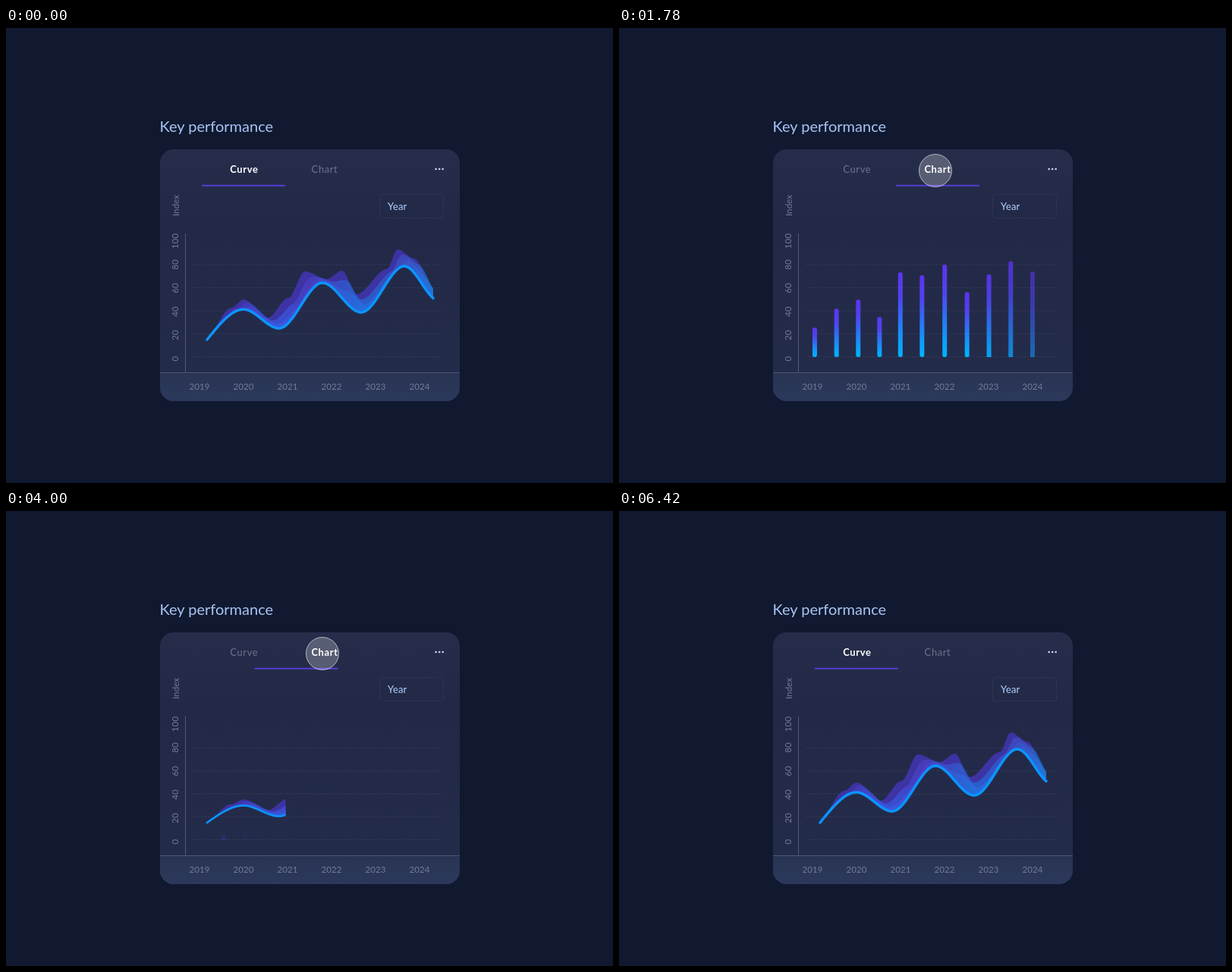
Recreate the animation shown at these times as an HTML page. Size 800x600 px, loop 6440 ms.

```html
<!DOCTYPE html>
<html lang="en">
<head>
<meta charset="utf-8">
<title>Key performance</title>
<style>
html, body { margin: 0; width: 100%; height: 100%; overflow: hidden; background: #10192f; }
svg { display: block; width: 800px; height: 600px; }
text { font-family: Lato, "Open Sans", sans-serif; }
.title { font-size: 20px; fill: #a9c4f5; }
.tab { font-size: 13px; letter-spacing: .6px; text-anchor: middle; fill: #6c728e; }
.on { font-weight: 700; fill: #fff; }
.axis { font-size: 11.5px; text-anchor: middle; fill: #737a98; letter-spacing: .1px; }
.grid { stroke: #363d5c; stroke-dasharray: 2 2; fill: none; }
</style>
</head>
<body>
<svg viewBox="0 0 800 600">
  <defs>
    <linearGradient id="cardFill" x2="0" y2="1">
      <stop stop-color="#262d4a"/><stop offset=".3" stop-color="#222947"/><stop offset="1" stop-color="#242c4b"/>
    </linearGradient>
    <linearGradient id="footFill" x2="0" y2="1">
      <stop stop-color="#293453"/><stop offset="1" stop-color="#2c395c"/>
    </linearGradient>
    <linearGradient id="barFill" x2="0" y2="1">
      <stop stop-color="#5c33f0"/><stop offset=".3" stop-color="#4e44ee"/><stop offset=".8" stop-color="#109bfa"/><stop offset="1" stop-color="#00b4ff"/>
    </linearGradient>
    <linearGradient id="waveFill" gradientUnits="userSpaceOnUse" x1="265" x2="565">
      <stop stop-color="#4a34b0"/><stop offset=".14" stop-color="#4b3bc0"/>
      <stop offset=".32" stop-color="#3563ee"/><stop offset=".45" stop-color="#4f3fc8"/>
      <stop offset=".68" stop-color="#1f78e6"/><stop offset=".87" stop-color="#3d55c8"/>
      <stop offset="1" stop-color="#1a86ee"/>
    </linearGradient>
    <clipPath id="reveal"><rect id="revealBox" x="256" y="260" height="194"/></clipPath>
    <clipPath id="aboveZero"><rect x="240" y="260" width="340" height="174"/></clipPath>
    <clipPath id="cardClip"><rect x="203" y="160" width="395" height="332" rx="18"/></clipPath>
  </defs>
  <rect width="800" height="600" fill="#10192f"/>
  <text class="title" x="202.5" y="137">Key performance</text>
  <g clip-path="url(#cardClip)">
    <rect x="203" y="160" width="395" height="332" fill="url(#cardFill)"/>
    <rect x="203" y="454" width="395" height="38" fill="url(#footFill)"/>
    <path d="M203 454.5H598" stroke="#4d5674"/>
  </g>
  <g id="axes"><path d="M236.5 271V454" stroke="#525977"/></g>
  <rect class="grid" x="492.5" y="219.5" width="84" height="31" rx="3"/>
  <text x="503" y="240" font-size="13" letter-spacing=".2" fill="#b4d0ff">Year</text>
  <g id="dots" fill="#ccd6f4"></g>
  <g id="tabs"></g>
  <rect id="underline" y="206.8" width="110" height="2" fill="#523dd2"/>
  <g id="bars" clip-path="url(#aboveZero)"></g>
  <g id="curve" clip-path="url(#reveal)">
    <g id="ribbon"></g>
    <path id="line" fill="none" stroke="#0b94ff" stroke-linecap="round" stroke-linejoin="round" vector-effect="non-scaling-stroke"/>
  </g>
  <circle id="cursor" r="21.5" fill="#fff" fill-opacity=".23" stroke="#fff" stroke-opacity=".6"/>
</svg>
<script>
const LOOP = 6440;
const CLICKS = [820, 2320, 3640, 5136]; // alternately Chart, Curve
const SLIDE = 600;
const RISE = 72;
const BASE = 411;
const ZERO = 434;

const $ = id => document.getElementById(id);
const set = (node, attrs) => { for (const key in attrs) node.setAttribute(key, attrs[key]); };
function add(parent, name, attrs, content = '') {
  const node = document.createElementNS('http://www.w3.org/2000/svg', name);
  set(node, attrs);
  node.textContent = content;
  return parent.appendChild(node);
}
const clamp = u => Math.max(0, Math.min(1, u));
const ease = u => { u = clamp(u); return u * u * (3 - 2 * u); };
const mix = (a, b, u) => a + (b - a) * u;

// A wave eases from each crest, trough or shelf to the next.
const wave = keys => x => keys.reduce((y, [keyX, keyY], i) =>
  i ? mix(y, keyY, ease((x - keys[i - 1][0]) / (keyX - keys[i - 1][0]))) : keyY, 0);
const lineY = wave([[217, 451], [313, 371], [360, 396], [417, 336], [468, 375], [525, 314], [571, 360]]);
const crestY = wave([[260, 414], [297, 369], [313, 358], [345, 382], [372, 356], [394, 321],
  [423, 331], [443, 320], [462, 351], [502, 318], [516, 292], [538, 304], [568, 356]]);

const xs = Array.from({ length: 150 }, (_, i) => 265 + 2 * i);
const trace = (f, list = xs) => list.map(x => `${x} ${f(x).toFixed(1)}`).join('L');

// Each layer trails the crest a little more and lies closer to the line.
for (let k = 0; k < 3; k++) {
  const top = x => Math.min(lineY(x), mix(crestY(x - 6 * k), lineY(x), .3 * k));
  add($('ribbon'), 'path', {
    d: `M${trace(top)}L${trace(lineY, [...xs].reverse())}Z`,
    fill: k ? 'url(#waveFill)' : '#4636c2', opacity: k ? .6 : .75
  });
}
$('line').setAttribute('d', 'M' + trace(lineY));

const axes = $('axes');
for (let i = 0; i < 6; i++) {
  add(axes, 'text', { class: 'axis', x: 255 + 58 * i, y: 477 }, 2019 + i);
  add(axes, 'text', { class: 'axis', transform: `translate(227 ${436 - 31 * i}) rotate(-90)` }, 20 * i);
  if (i < 5) add(axes, 'path', { class: 'grid', d: `M246 ${433.5 - 30.3 * i}H578` });
  if (i < 3) add($('dots'), 'circle', { cx: 566.7 + 4.5 * i, cy: 186, r: 1.3 });
}
add(axes, 'text', { class: 'axis', 'letter-spacing': .5, transform: 'translate(228 234) rotate(-90)' }, 'Index');

const tabs = [['Curve', 313.8], ['Chart', 420]].map(([name, x]) => ['tab', 'tab on'].map(
  style => add($('tabs'), 'text', { class: style, x, y: 191 }, name)));

// Half-yearly index values; the spacing tightens slightly around 2021.
const bars = [39, 64, 76, 53, 112, 108, 122, 86, 115, 143, 143].map((height, i) => add($('bars'), 'rect', {
  x: 255 + 28.7 * i - 2.3 * Math.exp(-(((i - 4.6) / 1.5) ** 2)),
  y: ZERO - height, width: 6, height, rx: 3, fill: 'url(#barFill)'
}));

const AWAY = [772, -27], ON_CHART = [417, 188], ON_CURVE = [321, 191];
function cursorAt(t) {
  let spot = AWAY;
  const move = (start, end, to) => {
    const u = ease((t - start) / (end - start));
    spot = spot.map((from, axis) => mix(from, to[axis], u));
  };
  CLICKS.forEach((click, i) => move(click - (i ? 360 : 740), click - 60, i % 2 ? ON_CURVE : ON_CHART));
  move(5300, 5935, AWAY);
  return { cx: spot[0], cy: spot[1] };
}

function draw(t) {
  const index = CLICKS.filter(click => click <= t).length - 1;
  const since = index < 0 ? LOOP : t - CLICKS[index];
  const toChart = index >= 0 && index % 2 === 0;
  const slide = ease(since / SLIDE);

  set($('underline'), { x: toChart ? mix(258, 365, slide) : mix(365, 258, slide) });
  const fade = clamp(since / 200);
  tabs.forEach(([plain, bold], i) => {
    const on = (i === 1) === toChart ? fade : 1 - fade;
    set(plain, { opacity: 1 - on });
    set(bold, { opacity: on });
  });

  // The curve closes all at once; opening, its height lags behind its length.
  const open = duration => toChart ? 1 - slide : ease((since - 63) / duration);
  const shown = open(660);
  const scaleY = s => `translate(0 ${BASE * (1 - s)}) scale(1 ${s})`;
  set($('revealBox'), { width: 6 + 305 * shown });
  set($('curve'), { opacity: Math.min(1, shown * 8) });
  set($('line'), { transform: scaleY(mix(.33, 1, open(690))), 'stroke-width': 2.2 + 1.3 * shown });
  set($('ribbon'), { transform: scaleY(mix(.35, 1, open(880))) });

  bars.forEach((bar, i) => {
    const up = toChart ? ease((since - 190 - 55 * i) / 400) : 1 - slide;
    set(bar, { transform: `translate(0 ${RISE * (1 - up)})`, opacity: up });
  });

  set($('cursor'), cursorAt(t));
}

const began = performance.now();
function tick() {
  draw((performance.now() - began) % LOOP);
  requestAnimationFrame(tick);
}
tick();
</script>
</body>
</html>
```
